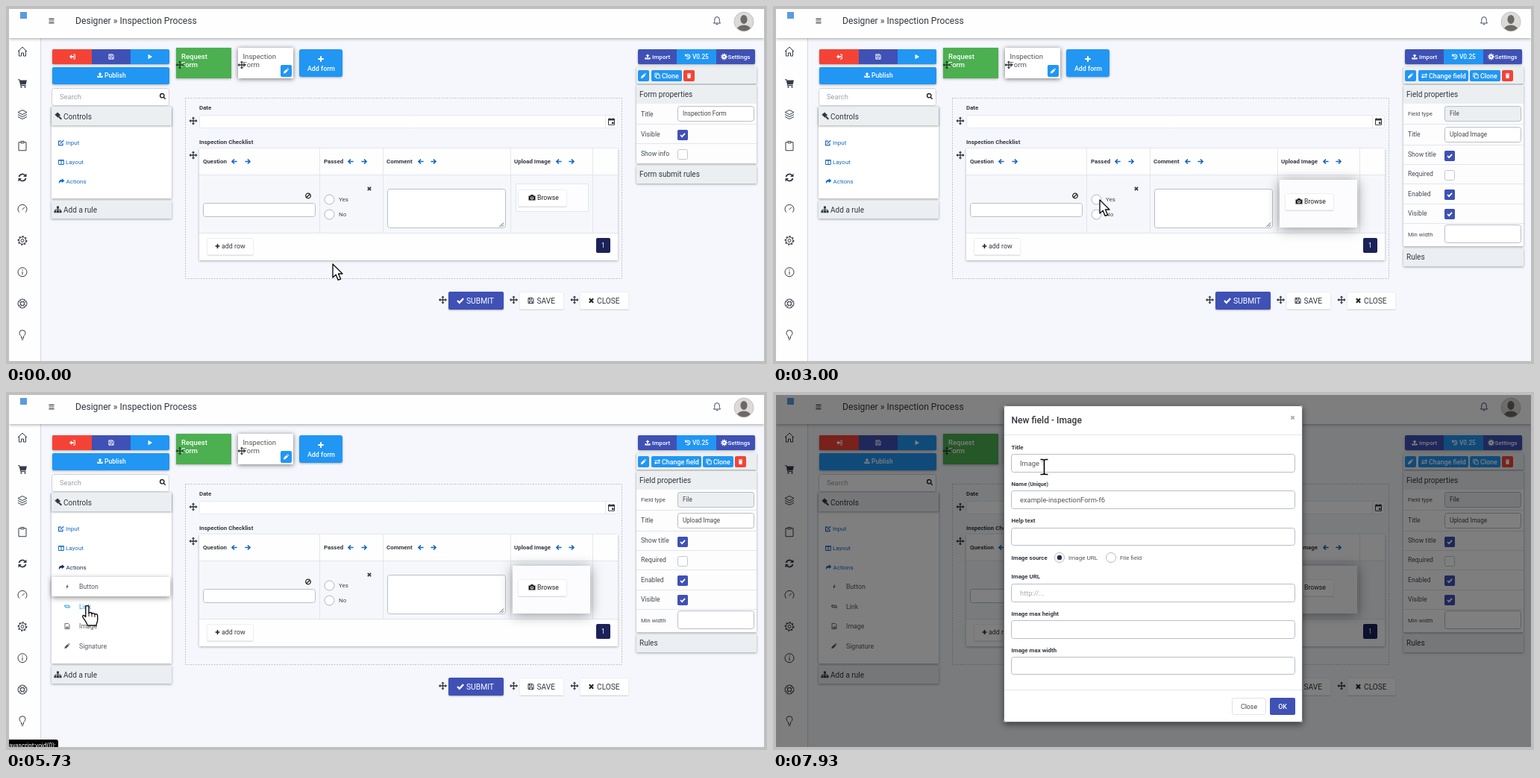
An HTML page with a canvas for the animation above (8 s loop, 1020 by 480 pixels).

```html
<!DOCTYPE html>
<html lang="en">
<head>
<meta charset="utf-8">
<title>Form designer</title>
<style>
  html, body { margin: 0; width: 100%; height: 100%; overflow: hidden; background: #bfbfbf; }
  canvas { display: block; }
</style>
</head>
<body>
<canvas id="stage" width="1020" height="480"></canvas>
<script>
const ctx = document.getElementById('stage').getContext('2d');
const LOOP = 8000, STEP = 200 / 3;
const RED = '#f44336', BLUE = '#2196f3', INDIGO = '#3f51b5', LINK = '#1769c4';
const INK = '#333840', BAR = '#eceff1', LINE = '#e2e6ec', EDGE = '#b9bec6';

// f: filled path, s: stroked path, w: line width; all centred on 0,0
const icons = {
  home: { s: 'M-6 0L0-6L6 0M-4.5-1.5V6H-1.5V2H1.5V6H4.5V-1.5' },
  cart: { f: 'M-6-5H-3.6L-3.2-3.7H6L4.6 2H-2L-1.8 2.8H4.5V3.8H-2.6L-4.4-4H-6ZM-2.5 4.2h2v2h-2zM2.5 4.2h2v2h-2z' },
  layers: { s: 'M0-6L6-3L0 0L-6-3ZM-6 0L0 3L6 0M-6 3L0 6L6 3' },
  clipboard: { s: 'M-2-5H-5V6H5V-5H2M-2-6.3H2V-4H-2Z' },
  refresh: { f: 'M5.5-5.5V-1H1ZM-5.5 5.5V1H-1Z', s: 'M-4.5-1A4.6 4.6 0 0 1 3.6-2.8M4.5 1A4.6 4.6 0 0 1-3.6 2.8', w: 1.8 },
  gauge: { s: 'M-4.2 4.4A6 6 0 1 1 4.2 4.4M-.5 1L3-2.5' },
  info: { s: 'M-6 0A6 6 0 1 1 6 0A6 6 0 1 1-6 0M0-3.4V-2M0-.8V3.5' },
  ring: { s: 'M-6 0A6 6 0 1 1 6 0A6 6 0 1 1-6 0M-2.5 0A2.5 2.5 0 1 1 2.5 0A2.5 2.5 0 1 1-2.5 0M-5-3L-2.2-1.2M-3-5L-1.2-2.2M5-3L2.2-1.2M3-5L1.2-2.2M-5 3L-2.2 1.2M-3 5L-1.2 2.2M5 3L2.2 1.2M3 5L1.2 2.2' },
  bulb: { s: 'M-1.5 4V2.5C-1.5 1-4-.2-4-2.6A4 4 0 0 1 4-2.6C4-.2 1.5 1 1.5 2.5V4ZM-1.3 6H1.3' },
  menu: { s: 'M-3.5-2.7H3.5M-3.5 0H3.5M-3.5 2.7H3.5', w: 1.2 },
  bell: { s: 'M-4.5 3.5C-3 2-3.3 0-3.2-1.5A3.2 3.4 0 0 1 3.2-1.5C3.3 0 3 2 4.5 3.5ZM-1.3 5.2H1.3' },
  move: { f: 'M-5.6 0l2.4-2.2v4.4zM5.6 0l-2.4-2.2v4.4zM0-5.6l-2.2 2.4h4.4zM0 5.6l-2.2-2.4h4.4z', s: 'M-4 0H4M0-4V4', w: 1.3 },
  right: { s: 'M-3.6 0H3M0-3L3 0L0 3', w: 1.7 },
  left: { s: 'M3.6 0H-3M0-3L-3 0L0 3', w: 1.7 },
  pencil: { f: 'M-4 4L-3.4 1.2L.6-2.8L2.8-.6L-1.2 3.4ZM1.3-3.5L2.2-4.2L4.2-2.2L3.5-1.3Z' },
  check: { s: 'M-3.3 0L-1 2.4L3.4-2.4', w: 1.9 },
  times: { s: 'M-2.4-2.4L2.4 2.4M2.4-2.4L-2.4 2.4', w: 1.9 },
  plus: { s: 'M-3.4 0H3.4M0-3.4V3.4', w: 1.9 },
  trash: { f: 'M-3-3.2h6v1h-6zM-1-4h2v.8h-2zM-2.6-1.6h5.2l-.4 5.6h-4.4z' },
  floppy: { s: 'M-3.5-3.5H2.3L3.5-2.3V3.5H-3.5ZM-2-3.5V-1.2H1.3V-3.5M-2 3.5V.9H2V3.5' },
  play: { f: 'M-2.7-3.5L3.5 0L-2.7 3.5Z' },
  exit: { f: 'M-4 0L-.8-3V-1H2V1H-.8V3Z', s: 'M1-3H3.3V3H1', w: 1 },
  upload: { f: 'M0-4L3-1H1.1V1.6H-1.1V-1H-3ZM-4 1.2h2v1h4v-1h2v2.6h-8z' },
  search: { s: 'M-3.4-.8A2.7 2.7 0 1 1 2-.8A2.7 2.7 0 1 1-3.4-.8M1.2 1.2L3.7 3.7', w: 1.4 },
  gavel: { f: 'M-.8-5L3-1.2L-.4 2.2L-4.6-1.8Z', s: 'M1 1L4.3 4.3', w: 2 },
  tree: { f: 'M-1.5-4.5h3v3h-3zM-5 1.3h3v3h-3zM-1.5 1.3h3v3h-3zM2 1.3h3v3h-3z', s: 'M0-2V2M-3.5 2V0H3.5V2', w: .9 },
  edit: { s: 'M2 .5V3.2H-3.4V-2.4H.3M-1.2 1L3.4-3.4', w: 1.2 },
  columns: { s: 'M-3.4-3H3.4V3H-3.4ZM0-3V3M-3.4-2.4H3.4' },
  share: { f: 'M4-.8L.4-3.8V-2C-3-2-4.2 0-3.4 3.5C-2.8 1.2-2 .4 .4 .4V2.2Z' },
  bolt: { f: 'M1-4L-2 .8H-.3L-1 4L2-1H.4Z' },
  link: { s: 'M-.5-.5L-2-2A1.5 1.5 0 0 0-3.6 0L-2 1.4A1.4 1.4 0 0 0 0 1M.5 .6L2 2A1.5 1.5 0 0 0 3.6 0L2-1.4A1.4 1.4 0 0 0 0-1', w: 1.2 },
  image: { f: 'M-2.5 2.8L-.8 .3L.4 1.4L1.4 0L2.5 2.8Z', s: 'M-3.3-4H1.8L3.3-2.5V4H-3.3Z' },
  camera: { f: 'M-4.5-2.5H-2.3L-1.5-4H1.5L2.3-2.5H4.5V3.5H-4.5ZM0-1.6A2 2 0 1 0 0 2.4A2 2 0 1 0 0-1.6M0-.7A1.1 1.1 0 1 1 0 1.5A1.1 1.1 0 1 1 0-.7' },
  calendar: { f: 'M-4.5-4h9v2.4h-9zM.5 .5h2.6v2.6h-2.6z', s: 'M-4-4V4.3H4V-4M-2.3-5V-3M2.3-5V-3' },
  ban: { s: 'M-3.3 0A3.3 3.3 0 1 1 3.3 0A3.3 3.3 0 1 1-3.3 0M-2.3 2.3L2.3-2.3', w: 1.3 },
  clone: { s: 'M-1.7-1.7H3.6V3.6H-1.7ZM-1.7 1.7H-3.6V-3.6H1.7V-1.7' },
  swap: { s: 'M-4-1.6H3.6M2-3.3L3.7-1.6L2 .1M4 1.8H-3.6M-2 .1L-3.7 1.8L-2 3.5', w: 1.2 },
  history: { s: 'M-2.8-1.5A3 3 0 1 1-2.4 2M-3.5-3.6V-1H-1M0-1.6V.4L1.2 1', w: 1.1 },
  arrow: { f: 'M0 0V18L4.2 14.2L7.2 21.4L10.6 20L7.5 13H13Z' },
  hand: { f: 'M-2.2 1C-2.2-1 2-1 2 1V9.5C2.3 8 6 8 6 10.5C6.5 9 10 9.2 10 11.5C10.5 10 13.7 10.5 13.7 13V19C13.7 22 12 23 12 26H0C0 23-3 20-6 15C-7 12.6-5 11-2.2 14.5Z' },
  beam: { s: 'M-5-10H-2Q0-10 0-8Q0-10 2-10H5M0-8V8M-5 10H-2Q0 10 0 8Q0 10 2 10H5' }
};
for (const k in icons)
  for (const part of ['f', 's'])
    if (icons[k][part]) icons[k][part] = new Path2D(icons[k][part]);

function icon(name, x, y, color = INK, scale = 1) {
  const { f, s, w = 1 } = icons[name];
  ctx.save();
  ctx.translate(x, y);
  ctx.scale(scale, scale);
  ctx.fillStyle = ctx.strokeStyle = color;
  ctx.lineWidth = w;
  if (f) ctx.fill(f, 'evenodd');
  if (s) ctx.stroke(s);
  ctx.restore();
}

function text(s, x, y, size, color = INK, weight = 400, align = 'left') {
  ctx.font = `${weight} ${size}px Roboto, "Open Sans", sans-serif`;
  ctx.textAlign = align;
  ctx.fillStyle = color;
  ctx.fillText(s, x, y + size * .355);
}

function box(x, y, w, h, fill, { r = 0, edge, blur = 0, dark = .3, dy = 1 } = {}) {
  ctx.save();
  ctx.beginPath();
  ctx.roundRect(x, y, w, h, r);
  if (blur) {
    ctx.shadowColor = `rgba(0,0,0,${dark})`;
    ctx.shadowBlur = blur;
    ctx.shadowOffsetY = dy;
  }
  ctx.fillStyle = fill;
  ctx.fill();
  ctx.restore();
  if (edge) {
    ctx.beginPath();
    ctx.roundRect(x + .5, y + .5, w - 1, h - 1, r);
    ctx.strokeStyle = edge;
    ctx.lineWidth = 1;
    ctx.stroke();
  }
}
const rule = (x, y, w, h = 1, c = LINE) => box(x, y, w, h, c);
const field = (x, y, w, h, fill = '#fff') => box(x, y, w, h, fill, { r: 3, edge: EDGE });
const bar = (x, y, w, h) => box(x, y, w, h, BAR, { blur: 3, dark: .35 });

function disc(x, y, r, fill, edge) {
  ctx.beginPath();
  ctx.arc(x, y, r, 0, 7);
  if (fill) { ctx.fillStyle = fill; ctx.fill(); }
  if (edge) { ctx.strokeStyle = edge; ctx.lineWidth = 1; ctx.stroke(); }
}
function radio(x, y, on) {
  disc(x, y, 6.5, '#fff', '#b4b8c0');
  if (on) disc(x, y, 3.2, '#2a2c45');
}
function checkbox(y, on) {
  box(900, y - 7, 14, 14, on ? INDIGO : '#fff', { r: 2, edge: on ? INDIGO : '#c3c7ce' });
  if (on) icon('check', 907, y, '#fff', .9);
}
function gear(x, y, r, color, solid) {
  disc(x, y, r, null, color);
  ctx.save();
  ctx.setLineDash([r * .42, r * .48]);
  ctx.lineWidth = solid ? 2 : 1.6;
  ctx.beginPath();
  ctx.arc(x, y, r + .9, 0, 2 * Math.PI);
  ctx.stroke();
  ctx.restore();
  if (solid) {
    ctx.lineWidth = 2;
    ctx.beginPath();
    ctx.arc(x, y, r - .6, 0, 7);
    ctx.stroke();
  } else disc(x, y, 2, null, color);
}

function chrome() {
  box(0, 0, 1020, 480, '#bfbfbf');
  box(4, 4, 1012, 472, '#f5f7fc');
  box(4, 43, 42, 433, '#fefefe');
  rule(46, 43, 1, 433, '#d6d8dc');
  ctx.save();
  ctx.beginPath();
  ctx.rect(4, 4, 1012, 50);
  ctx.clip();
  box(4, 4, 1012, 39, '#fefefe', { blur: 4, dark: .35 });
  ctx.restore();
  box(19, 8, 9, 9, '#5b9be0');
  icon('menu', 61, 20);
  text('Designer » Inspection Process', 93, 19.5, 12.15);
  icon('bell', 953, 19.5, '#3c465c');
  disc(989, 21, 13, '#dcdad8', '#c4c4c4');
  ctx.save();
  ctx.beginPath();
  ctx.arc(989, 21, 12.5, 0, 7);
  ctx.clip();
  ctx.fillStyle = '#6d6967';
  ctx.beginPath();
  ctx.ellipse(989, 18, 4.6, 6, 0, 0, 7);
  ctx.ellipse(989, 33, 10, 7.5, 0, 0, 7);
  ctx.fill();
  ctx.restore();
  ['home', 'cart', 'layers', 'clipboard', 'refresh', 'gauge', '', 'info', 'ring', 'bulb'].forEach((n, i) => {
    const y = 61 + i * 42.25;
    if (n) icon(n, 22, y, '#343b48');
    else gear(22, y, 4.7, '#343b48');
  });
}

const items = [['Button', 'bolt'], ['Link', 'link'], ['Image', 'image'], ['Signature', 'pencil']];

function leftPanel(f) {
  box(62, 58, 157, 20, BLUE, { r: 2, blur: 3 });
  box(62, 58, 53, 20, RED, { r: [2, 0, 0, 2] });
  box(115, 58, 52, 20, INDIGO);
  icon('exit', 89, 68, '#fff');
  icon('floppy', 141, 68, '#fff', .9);
  icon('play', 193, 68, '#fff', .9);
  box(62, 82, 157, 23, BLUE, { r: 2, blur: 3 });
  icon('upload', 126, 92.5, '#fff', .9);
  text('Publish', 132, 93, 8.6, '#fff', 500);
  box(61, 110, 158, 24, '#fff', { r: 3, edge: '#cdd1d8' });
  text('Search', 72, 122, 9.4, '#9aa0a8');
  icon('search', 210, 121, '#222');

  const p = f < 72 ? 0 : Math.min(1, (f - 72) / 6 + .27);
  const grow = 106 * (.5 - .5 * Math.cos(Math.PI * p));
  box(61, 135, 161, 123 + grow, '#fff', { blur: 3, dark: .35 });
  bar(61, 135, 161, 25);
  icon('gavel', 70, 147.5);
  text('Controls', 77, 148, 10.1);
  const hot = f >= 55 && f < 88 ? '#1c2b4d' : LINK;
  icon('edit', 74, 183.5, LINK);
  text('Input', 80, 183.5, 8.1, LINK);
  icon('columns', 74, 209.5, LINK);
  text('Layout', 80, 209.5, 8, LINK);
  icon('share', 74.5, 235, hot);
  text('Actions', 80.5, 235, 8, hot);

  ctx.save();
  ctx.beginPath();
  ctx.rect(55, 240, 170, 18 + grow);
  ctx.clip();
  const lifted = f >= 82 && f < 88 ? 0 : f >= 89 && f < 100 ? 2 : -1;
  if (p > 0) items.forEach(([label, name], i) => {
    const y = 261 + i * 26.5;
    if (i === lifted) box(61, y - 13, 159, 26, '#fff', { r: 2, blur: 7, dark: .45, dy: 2 });
    const c = i === 1 && f > 84 && f < 89 ? '#35a0e8' : '#555a60';
    icon(name, 82, y, c, .9);
    text(label, 98, y, 8.75, c);
  });
  ctx.restore();
  bar(61, 261 + grow, 161, 24);
  icon('tree', 69.5, 273 + grow);
  text('Add a rule', 77, 273 + grow, 10.05);
}

function tabs() {
  box(228, 56, 74, 41, '#4caf50', { blur: 3 });
  text('Request', 235, 68, 9.5, '#fff', 500);
  text('Form', 235, 78.5, 9.5, '#fff', 500);
  icon('move', 233, 79, '#23402a');
  box(311, 56, 74, 41, '#fff', { blur: 6, dark: .55 });
  text('Inspection', 317.5, 68, 9.6, '#555');
  text('Form', 317.5, 78.5, 9.6, '#555');
  icon('move', 316, 79);
  box(368, 79, 15, 16, BLUE, { r: 2 });
  icon('pencil', 375.5, 87, '#fff', .9);
  box(393, 58, 58, 37, BLUE, { r: 3, blur: 3 });
  icon('plus', 422, 71, '#fff', 1.1);
  text('Add form', 422.5, 84, 8.9, '#fff', 500, 'center');
}

function whiteButton(x, y, w, h) {
  box(x, y, w, h, '#fff', { r: 2, edge: '#eceef2', blur: 1, dark: .12 });
}

function formArea(picked) {
  ctx.save();
  ctx.setLineDash([2, 1.5]);
  ctx.strokeStyle = '#bfc3ca';
  ctx.lineWidth = 1;
  ctx.strokeRect(240.5, 123.5, 585, 242);
  ctx.restore();

  text('Date', 259, 136, 7.9, INK, 700);
  box(259, 146, 561, 18, '#fff', { r: 2, edge: '#e6e9ef' });
  rule(803, 147, 1, 16);
  icon('calendar', 811.5, 155);
  icon('move', 251, 154);
  text('Inspection Checklist', 259, 182, 7.9, INK, 700);
  icon('move', 251, 200);

  box(259, 191, 561, 150, '#fefefe', { blur: 3, dark: .3 });
  box(259, 226, 561, 78, '#f5f7fb');
  rule(259, 226, 561);
  rule(259, 304, 561);
  for (const x of [420, 505, 676, 786]) rule(x, 191, 1, 113);
  for (const [label, x, a, b] of [['Question', 264, 306, 324], ['Passed', 426, 462, 480], ['Comment', 510, 556, 573], ['Upload Image', 681, 741, 758]]) {
    text(label, x, 208.5, 7.9, INK, 700);
    icon('left', a, 208.5, LINK);
    icon('right', b, 208.5, LINK);
  }
  icon('ban', 405, 254.5, '#222');
  field(264, 264, 151, 19);
  icon('times', 487, 245, INK, .9);
  radio(433.5, 259.5);
  radio(433.5, 279.5);
  text('Yes', 446, 259, 8, '#444');
  text('No', 446, 279, 8, '#444');
  field(511, 245, 159, 53);
  ctx.strokeStyle = '#555';
  ctx.beginPath();
  ctx.moveTo(661.5, 296); ctx.lineTo(667, 290.5);
  ctx.moveTo(664.5, 296); ctx.lineTo(667, 293.5);
  ctx.stroke();

  const dy = picked ? 5 : 0;
  if (picked) box(679, 233, 104, 64, '#fcfcfe', { blur: 16, dark: .4, dy: 2 });
  else box(683, 238, 98, 38, '#fdfdff', { edge: '#e3e6ec' });
  whiteButton(686, 246 + dy, 66, 23);
  icon('camera', 705, 257 + dy, '#222');
  text('Browse', 712, 257 + dy, 8.7, '#222');

  whiteButton(269, 311, 63, 23);
  icon('plus', 283.5, 322, '#222', .85);
  text('add row', 289, 322, 8.9);
  box(791, 311, 19, 20, '#1b2259', { r: 2 });
  text('1', 800.5, 321, 8.5, '#fff', 400, 'center');

  for (const x of [585.5, 680.5, 762]) icon('move', x, 394);
  box(593, 383, 74, 24, INDIGO, { r: 2, blur: 2 });
  icon('check', 609, 395, '#fff', 1.2);
  text('SUBMIT', 617, 395, 10.3, '#fff');
  whiteButton(688, 383, 60, 24);
  icon('floppy', 703.5, 395);
  text('SAVE', 711.5, 395, 10.2);
  whiteButton(769, 383, 66, 24);
  icon('times', 784.5, 395, '#222', 1.1);
  text('CLOSE', 792, 395, 10.2);
}

function rightPanel(picked) {
  box(847, 58, 157, 20, INDIGO, { r: 2, blur: 3 });
  box(899, 58, 53, 20, BLUE);
  icon('upload', 860, 68, '#fff', .9);
  text('Import', 866, 68.5, 8.1, '#fff', 500);
  icon('history', 914, 68, '#fff');
  text('V0.25', 920, 68.5, 8.3, '#fff', 500);
  gear(962.5, 68, 2.5, '#fff', true);
  text('Settings', 967.5, 68.5, 8.1, '#fff', 500);

  bar(845, 82, 161, 22);
  const chip = (x, w, c, name, label) => {
    box(x, 86, w, 15, c, { r: 2 });
    icon(name, label ? x + 8 : x + w / 2, 93.5, '#fff', .9);
    if (label) text(label, x + 14, 93.5, 8.9, '#fff', 500);
  };
  chip(847, 15, BLUE, 'pencil');
  if (picked) chip(865, 67, BLUE, 'swap', 'Change field');
  const x = picked ? 934 : 865;
  chip(x, 41, BLUE, 'clone', 'Clone');
  chip(x + 43, 15, RED, 'trash');

  const end = picked ? 322 : 211;
  box(845, 106, 161, end - 106, '#fdfdfe', { blur: 3, dark: .35 });
  box(845, 106, 161, 25, BAR);
  text(picked ? 'Field properties' : 'Form properties', 849, 118.5, 10);
  const label = (s, y, size = 8.6) => text(s, 851, y, size, '#444a52');
  const input = (s, y, fill) => {
    field(900, y - 10.5, 103, 21, fill);
    text(s, 907, y, 8.15, '#444');
  };
  if (picked) {
    for (const y of [158, 186, 212, 238, 265, 291]) rule(845, y, 161);
    label('Field type', 144.5, 7.7);
    input('File', 144.5, BAR);
    label('Title', 172);
    input('Upload Image', 172.5);
    ['Show title', 'Required', 'Enabled', 'Visible'].forEach((s, i) => {
      label(s, 199 + i * 26.3);
      checkbox(201 + i * 26, i !== 1);
    });
    label('Min width', 306, 7.7);
    field(900, 293, 103, 25);
  } else {
    rule(845, 158, 161);
    rule(845, 184, 161);
    label('Title', 144.5);
    input('Inspection Form', 144.5);
    label('Visible', 172);
    checkbox(173, true);
    label('Show info', 197.5);
    checkbox(199, false);
  }
  bar(845, end + 3, 161, 24);
  text(picked ? 'Rules' : 'Form submit rules', 849, end + 14.5, 10);
}

function statusBar() {
  ctx.save();
  ctx.beginPath();
  ctx.roundRect(4, 466, 66, 10, [0, 3, 0, 0]);
  ctx.clip();
  box(4, 466, 66, 10, '#000');
  text('avascript:void(0);', 4, 474, 8.2, '#fff');
  ctx.restore();
}

function modal(f) {
  box(4, 4, 1012, 472, 'rgba(0,0,0,.5)');
  box(309, 18, 401, 425, '#fff', { r: 3, edge: '#6d6f73', blur: 8, dark: .5, dy: 3 });
  text('New field - Image', 319.5, 38, 12.1, '#33363c', 500);
  icon('times', 696.5, 34.5, '#aaa', .9);
  rule(310, 57, 399);
  const label = (s, y) => text(s, 319.5, y, 7.9, INK, 700);
  const row = (s, y, value, top, h, color = '#555') => {
    label(s, y);
    field(319, top, 381, h);
    if (value) text(value, 331, top + h / 2, 9.35, color);
  };
  row('Title', 74, 'Image 1', 83, 25);
  if (Math.floor((f - 98) / 7.5) % 2 === 0) rule(364, 90, 1, 12, '#222');
  row('Name', 123, 'example-inspectionForm-f6', 132, 25);
  text('(Unique)', 342, 123.5, 7, INK, 700);
  row('Help text', 172.5, '', 182, 24);
  label('Image source', 222);
  radio(384, 222, true);
  text('Image URL', 396, 222, 8.1, '#555');
  radio(453, 222);
  text('File field', 465, 222, 7.9, '#555');
  row('Image URL', 247.5, 'http://...', 257, 25, '#a9adb3');
  row('Image max height', 297, '', 306, 25);
  row('Image max width', 346, '', 355, 24);
  rule(310, 399, 399);
  box(615, 410, 46, 23, '#fff', { r: 2, edge: '#e0e2e6' });
  text('Close', 638, 421.5, 8.8, '#444', 400, 'center');
  box(666, 410, 34, 23, INDIGO, { r: 2 });
  text('OK', 683, 421.5, 8.8, '#fff', 500, 'center');
}

// step, x, y of the pointer's hot spot
const track = [
  [0, 438, 346], [1, 438, 346], [5, 470, 358], [9, 560, 350], [14, 661, 310], [20, 715, 268],
  [26, 760, 246], [32, 760, 246], [33, 757, 246], [39, 620, 270], [45, 438, 260], [51, 270, 240],
  [56, 169, 230], [58, 142, 229], [62, 112, 226], [66, 101, 230], [72, 101, 230], [78, 105, 240],
  [84, 109, 266], [86, 109, 287], [89, 114, 306], [95, 116, 314], [98, 116, 314], [104, 250, 240],
  [110, 370, 154], [114, 360, 110], [119, 363.5, 100.5], [120, 363.5, 100.5]
];

function slope(i, k) {
  const a = track[i - 1], b = track[i], c = track[i + 1];
  if (!a || !c) return 0;
  const before = b[k] - a[k], after = c[k] - b[k];
  return before * after <= 0 ? 0 : (before + after) / (c[0] - a[0]);
}

function along(f, k) {
  let i = 0;
  while (i < track.length - 2 && track[i + 1][0] <= f) i++;
  const a = track[i], b = track[i + 1], d = b[0] - a[0], u = (f - a[0]) / d, v = 1 - u;
  return a[k] * (1 + 2 * u) * v * v + b[k] * u * u * (3 - 2 * u)
    + d * (slope(i, k) * u * v * v - slope(i + 1, k) * u * u * v);
}

function pointer(f) {
  const x = along(f, 1), y = along(f, 2);
  const inside = (l, t, r, b) => x > l && x < r && y > t && y < b;
  let kind = 'arrow';
  if (f >= 98) {
    if (f < 99) kind = 'hand';
    else if ([[83, 108], [132, 157], [182, 206]].some(([t, b]) => inside(319, t, 700, b))) kind = 'beam';
  } else if (inside(61, 222, 220, 356)) kind = 'hand';
  else if (inside(511, 245, 670, 298)) kind = 'beam';

  const { f: shape, s: lines } = icons[kind];
  ctx.save();
  ctx.translate(x, y);
  ctx.lineJoin = 'round';
  if (lines) {
    ctx.strokeStyle = '#fff';
    ctx.lineWidth = 3.6;
    ctx.stroke(lines);
    ctx.strokeStyle = '#000';
    ctx.lineWidth = 1.6;
    ctx.stroke(lines);
  } else {
    ctx.fillStyle = '#fff';
    ctx.strokeStyle = '#111';
    ctx.lineWidth = 1.4;
    ctx.fill(shape);
    ctx.stroke(shape);
    if (kind === 'hand') {
      ctx.lineWidth = 1;
      ctx.stroke(new Path2D('M2 9V14M6 10V14.5M10 11V15'));
    }
  }
  ctx.restore();
}

function draw(now) {
  const f = Math.floor((now % LOOP + 7) / STEP) % 120;
  const picked = f >= 28;
  chrome();
  leftPanel(f);
  tabs();
  formArea(picked);
  rightPanel(picked);
  if (f >= 62 && f < 89) statusBar();
  if (f >= 98) modal(f);
  pointer(f);
}

const start = performance.now();
function tick() {
  draw(performance.now() - start);
  requestAnimationFrame(tick);
}
tick();
</script>
</body>
</html>
```
